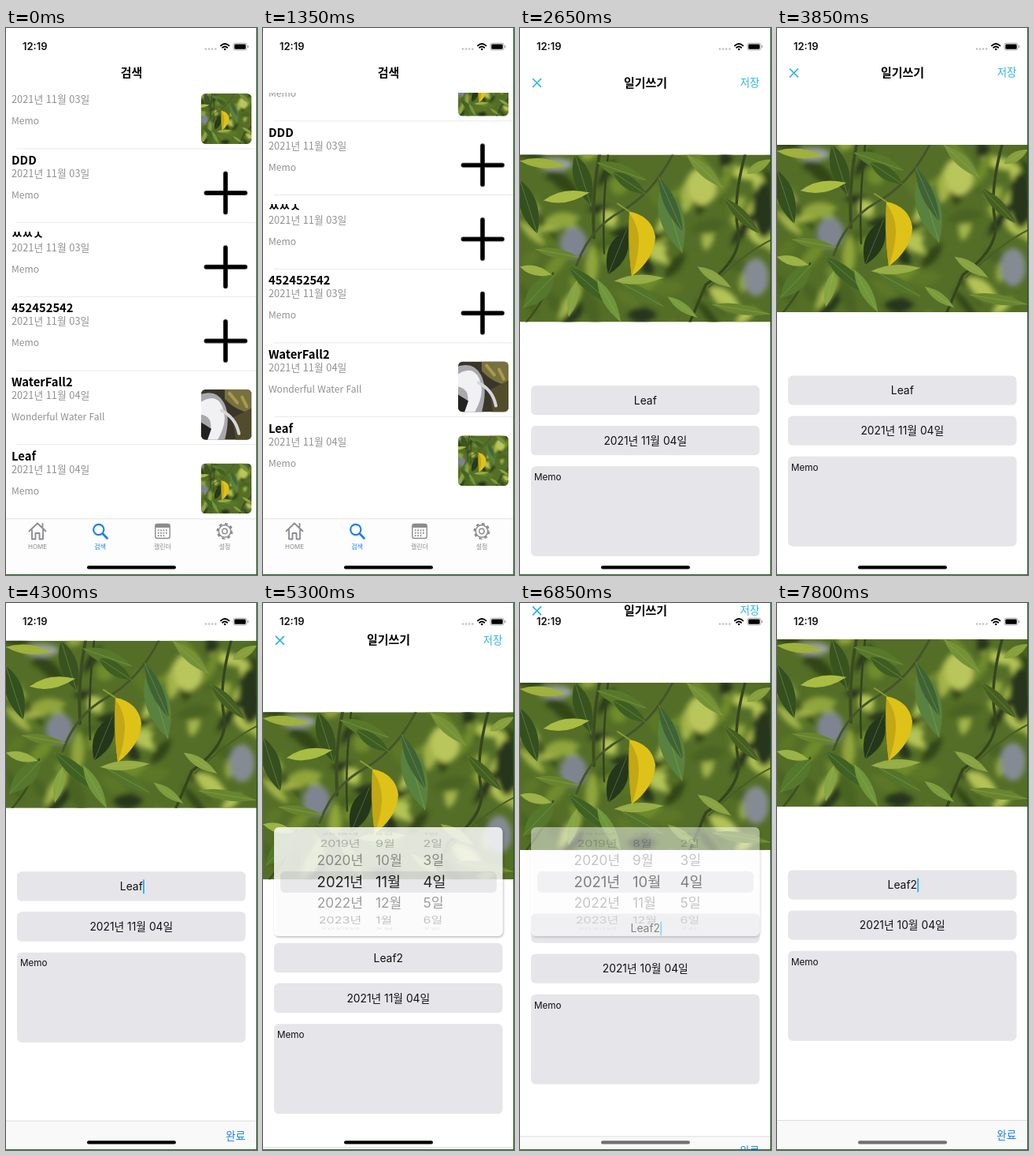
An HTML page that plays this animation: 319 px wide and 693 px high, repeating every 8 s.

```html
<!DOCTYPE html>
<html lang="ko">
<head>
<meta charset="utf-8">
<title>Diary</title>
<style>
  html, body { margin: 0; width: 100%; height: 100%; overflow: hidden; background: #fff; }
  svg { display: block; }
  text { font-family: Inter, "Noto Sans CJK KR", sans-serif; fill: #111; }
  .kr { font-family: "Noto Sans CJK KR", "Noto Sans CJK", sans-serif; }
  .head { font-size: 15px; font-weight: 800; fill: #000; }
  .title { font-size: 14.8px; font-weight: 700; fill: #000; }
  .date { font-size: 12.8px; font-weight: 300; fill: #909090; }
  .memo { font-size: 12.1px; font-weight: 300; fill: #909090; }
  .tab { font-size: 8px; fill: #8b8b8f; }
  .mid { text-anchor: middle; }
  .field { fill: #e5e5ea; }
</style>
</head>
<body>
<svg id="stage" width="319" height="693" viewBox="0 0 319 693"></svg>
<script>
const W = 319, H = 693, LOOP = 8000, STEP = 50;
const LIFT = 102, BAR = 38, ROW = 93.7, ROW0 = 59.3;
const GRAY = '#8b8b8f', CYAN = '#2cb4e8', BLUE = '#1a80ee';

let seed = 11;
const rnd = (a, b) => {
  seed = (seed * 16807) % 2147483647;
  return a + (b - a) * seed / 2147483647;
};
const text = (x, y, cls, str, extra = '') =>
  `<text x="${x}" y="${y}" class="${cls}" ${extra}>${str}</text>`;
const rect = (x, y, w, h, fill, rx = 0, extra = '') =>
  `<rect x="${x}" y="${y}" width="${w}" height="${h}" fill="${fill}" rx="${rx}" ${extra}/>`;
const line = (d, color, w, extra = '') =>
  `<path d="${d}" fill="none" stroke="${color}" stroke-width="${w}" stroke-linecap="round" ${extra}/>`;

// A leaf from base to tip, bulging by w on both sides
function leaf(x1, y1, x2, y2, w, fill) {
  const len = Math.hypot(x2 - x1, y2 - y1);
  const nx = -(y2 - y1) / len * w, ny = (x2 - x1) / len * w;
  const mx = x1 + (x2 - x1) * .45, my = y1 + (y2 - y1) * .45;
  return `<path d="M${x1} ${y1}Q${mx + nx} ${my + ny} ${x2} ${y2}Q${mx - nx} ${my - ny} ${x1} ${y1}" fill="${fill}"/>`;
}

function photo() {
  const tones = ['#314419', '#496320', '#6f8b2c', '#90a53b', '#b4c355', '#26351a', '#5b7726', '#a3b44a'];
  let soft = '', sharp = '';
  for (let i = 0; i < 75; i++) {
    const x = rnd(-10, 325), y = rnd(-10, 220), a = rnd(0, 6.28), l = rnd(25, 60);
    soft += leaf(x, y, x + l * Math.cos(a), y + l * Math.sin(a), rnd(10, 22), tones[i % tones.length]);
  }
  soft += `<ellipse cx="68" cy="112" rx="17" ry="20" fill="#7f8590"/><ellipse cx="300" cy="155" rx="16" ry="24" fill="#858b92"/>
    <ellipse cx="45" cy="12" rx="22" ry="8" fill="#9aa09c"/><ellipse cx="232" cy="40" rx="18" ry="24" fill="#b9c65c"/>
    <ellipse cx="310" cy="70" rx="14" ry="35" fill="#26341d"/>`;
  sharp += line('M101 0Q91 50 94 105', '#3c4c20', 4) + line('M112 0Q104 70 107 125', '#33431d', 2.5)
    + line('M194 0Q168 50 128 72T72 140', '#46552a', 3) + line('M286 0Q270 60 277 95T236 165L216 212', '#36451f', 3.5)
    + line('M319 108Q285 125 240 168', '#4a5d26', 2) + line('M42 150Q35 180 8 212', '#3c4c20', 2.5);
  const leaves = [
    [0, 32, 22, 100, 22, '#35501f'], [0, 8, 58, 14, 12, '#9fb13c'], [70, 0, 90, 64, 22, '#38531f'],
    [98, 10, 160, 32, 18, '#58782a'], [118, 22, 160, 50, 16, '#3e5d22'], [180, 36, 206, 124, 30, '#59813f'],
    [176, 28, 207, 98, 15, '#3f6334'], [212, 0, 258, 42, 14, '#769236'], [135, 96, 112, 152, 24, '#24371a'],
    [30, 58, 88, 48, 14, '#a9bd43'], [44, 152, 4, 194, 23, '#55782c'], [0, 142, 40, 152, 12, '#9bb247'],
    [62, 142, 118, 190, 17, '#3f6124'], [98, 158, 128, 212, 14, '#6f963b'], [72, 160, 62, 205, 13, '#85a442'],
    [128, 162, 182, 192, 15, '#54742b'], [120, 160, 182, 156, 12, '#97ad45'], [188, 180, 225, 206, 11, '#7b9c3d'],
    [226, 142, 268, 168, 12, '#89a343'], [245, 190, 318, 202, 13, '#68852f'], [260, 55, 304, 100, 14, '#455f22'],
    [288, 24, 319, 6, 12, '#87a03c'], [20, 120, 75, 130, 12, '#68842f']
  ];
  for (const l of leaves) {
    sharp += leaf(...l);
    sharp += line(`M${l[0]} ${l[1]}L${l[2]} ${l[3]}`, '#a5bb62', .6, 'opacity=".6"');
  }
  sharp += '<path d="M139 72Q168 78 172 104Q171 132 142 154Q137 118 139 72" fill="#dfc217"/>'
    + '<path d="M139 74Q152 92 151 112T142 154Q137 118 139 74" fill="#c4a715"/>'
    + line('M139 72L124 62', '#8d9a35', 2);
  return rect(0, 0, W, 212, '#546e27') + `<g filter="url(#blur)">${soft}</g><g filter="url(#fine)">${sharp}</g>`;
}

function waterfall() {
  return rect(0, 0, 64, 64, '#39352a')
    + '<g filter="url(#fine)"><path d="M30 0H64V30Q45 28 30 12Z" fill="#77713f"/><path d="M40 36L64 24V64H44Z" fill="#514c2b"/>'
    + '<path d="M0 6Q20 0 29 17Q38 34 30 64H2L0 40Z" fill="#a9a9ad"/><path d="M0 16Q19 4 27 22T21 64H8Q20 36 0 32Z" fill="#f1f1f3"/>'
    + line('M26 27Q44 36 48 56', '#d6d6da', 4) + line('M36 5L46 17M52 10L58 22', '#a79a4e', 4)
    + '<path d="M0 42L13 50L8 64H0Z" fill="#24231f"/></g>';
}

function row(i, title, date, memo, pic) {
  const y = ROW0 + ROW * i;
  const thumb = {
    leaf: `<g transform="translate(248 ${y + 23.6})" clip-path="url(#thumb)"><use href="#photo" transform="translate(-16.2 0) scale(.302)"/></g>`,
    fall: `<g transform="translate(248 ${y + 23.6})" clip-path="url(#thumb)">${waterfall()}</g>`,
    plus: line(`M254.5 ${y + 56}H304M279 ${y + 31.5}V${y + 80.5}`, '#444', 6) + line(`M254.5 ${y + 56}H304M279 ${y + 31.5}V${y + 80.5}`, '#000', 4.4)
  }[pic];
  return rect(13.6, y - .4, 306, .8, '#e4e4e4') + text(7, y + 20, 'kr title', title)
    + text(7, y + 36, 'kr date', date) + text(7, y + 63, 'kr memo', memo) + thumb;
}

function tabs() {
  let dots = '';
  for (let i = 0; i < 11; i++) dots += rect(192.8 + (i % 4) * 3.4, 635.5 + Math.floor(i / 4) * 3.4, 1.8, 1.8, GRAY);
  return rect(0, 621.5, W, 72, '#fdfdfd') + rect(0, 621.5, W, .8, '#dcdcdc')
    + line('M29.5 637.5L40 627.5L50.5 637.5M33 636V647.5H37.5V640H42.5V647.5H47V636M46.5 632V628', GRAY, 1.8, 'stroke-linejoin="round"')
    + `<circle cx="117.8" cy="635.5" r="6.6" fill="none" stroke="${BLUE}" stroke-width="2.2"/>` + line('M122.8 640.6L128.5 646.4', BLUE, 2.8)
    + rect(189.8, 628.5, 18.4, 18, 'none', 2.5, `stroke="${GRAY}" stroke-width="1.4"`) + rect(189.8, 628.5, 18.4, 4.5, GRAY, 1.5) + dots
    + `<g fill="none" stroke="${GRAY}"><circle cx="278" cy="637.5" r="7.7" stroke-width="1.5"/><circle cx="278" cy="637.5" r="3.2" stroke-width="1.4"/>
       <circle cx="278" cy="637.5" r="9.3" stroke-width="2.4" pathLength="16" stroke-dasharray="1"/></g>`
    + text(40, 660, 'tab mid', 'HOME') + text(119.7, 660, 'kr tab mid', '검색', `style="fill:${BLUE};font-weight:500"`)
    + text(199, 660, 'kr tab mid', '캘린더') + text(278, 660, 'kr tab mid', '설정');
}

function editor() {
  return line('M16.5 52L26.5 62M26.5 52L16.5 62', CYAN, 1.7)
    + text(159.5, 62, 'kr head mid', '일기쓰기') + text(279.8, 61.4, 'kr', '저장', `style="font-size:13.4px;font-weight:500;fill:${CYAN}"`)
    + '<use href="#photo" y="148" clip-path="url(#frame)"/>'
    + '<rect class="field" x="14" y="440.5" width="290.5" height="37.3" rx="6"/><rect class="field" x="14" y="491.5" width="290.5" height="37.3" rx="6"/><rect class="field" x="14" y="542.8" width="290.5" height="114" rx="6"/>'
    + text(159.3, 464.4, 'mid', 'Leaf', 'id="name" font-size="13.9"') + text(159.3, 515.4, 'mid', '', 'id="day" font-size="13.8"')
    + text(18, 560.6, '', 'Memo', 'font-size="11.7"') + rect(0, 450.5, 1.9, 18, CYAN, .9, 'id="caret"');
}

function status() {
  let dots = '';
  for (let i = 0; i < 4; i++) dots += `<circle cx="${254 + i * 4.1}" cy="26.6" r="1.3" fill="#c2c2c2"/>`;
  return text(21, 28, '', '12:19', 'font-size="13" font-weight="600"') + dots
    + line('M273 22.4Q278.2 17.8 283.4 22.4M275.2 24.8Q278.2 22.2 281.2 24.8', '#000', 1.9)
    + '<circle cx="278.2" cy="27" r="1.3"/>'
    + rect(289, 19.2, 17, 8.8, 'none', 2.4, 'stroke="#999" stroke-width=".8"') + rect(290.3, 20.5, 14.4, 6.2, '#000', 1.3) + rect(307, 22, 1.2, 3.2, '#999', .6);
}

const D3 = '2021년 11월 03일', D4 = '2021년 11월 04일';
const rows = [
  ['', D3, 'Memo', 'leaf'], ['DDD', D3, 'Memo', 'plus'], ['ㅆㅆㅅ', D3, 'Memo', 'plus'],
  ['452452542', D3, 'Memo', 'plus'], ['WaterFall2', D4, 'Wonderful Water Fall', 'fall'], ['Leaf', D4, 'Memo', 'leaf']
];
const $ = id => document.getElementById(id);

$('stage').innerHTML = `
<defs>
  <filter id="blur"><feGaussianBlur stdDeviation="3.2"/></filter>
  <filter id="fine"><feGaussianBlur stdDeviation=".45"/></filter>
  <filter id="shade" x="-10%" y="-10%" width="120%" height="125%"><feDropShadow dx="1" dy="1.5" stdDeviation="1.5" flood-opacity=".35"/></filter>
  <clipPath id="frame"><rect width="319" height="212"/></clipPath>
  <clipPath id="thumb"><rect width="64" height="64" rx="6"/></clipPath>
  <clipPath id="view"><rect y="82" width="319" height="540"/></clipPath>
  <clipPath id="card"><rect x="14" y="284" width="290.5" height="138" rx="6"/></clipPath>
  <g id="photo" clip-path="url(#frame)">${photo()}</g>
</defs>
${rect(0, 0, W, H, '#fff')}
<g clip-path="url(#view)"><g id="list">${rows.map((r, i) => row(i, ...r)).join('')}</g></g>
${text(159.5, 62, 'kr head mid', '검색')}
${tabs()}
<g id="sheet">${rect(0, 0, W, H, '#fff')}<g id="form">${editor()}</g></g>
<g id="bar">${rect(0, 0, W, BAR + 2, '#f9f9f9')}${rect(0, 0, W, .8, '#d8d8d8')}
  ${text(279.3, 24, 'kr', '완료', `style="font-size:13.6px;font-weight:500;fill:${BLUE}"`)}</g>
<g id="picker">
  ${rect(14, 284, 290.5, 138, '#fff', 6, 'fill-opacity=".9" filter="url(#shade)"')}
  ${rect(22, 340, 275, 27, '#747480', 6, 'fill-opacity=".15"')}
  <g id="wheels" clip-path="url(#card)"></g>
</g>
${status()}
${rect(103, 681.3, 113, 4.2, '#000', 2.1, 'id="home"')}
${rect(318.1, 0, .9, H, '#17601c')}${rect(0, 692.1, W, .9, '#17601c')}`;

// Critically damped spring, time in ms
const spring = ms => {
  const x = Math.max(0, ms) * .0132;
  return 1 - (1 + x) * Math.exp(-x);
};
const ramp = (t, a, b) => Math.min(1, Math.max(0, (t - a) / (b - a)));
const ease = u => 1 - (1 - u) ** 3;

// One wheel turned to value v; label() names each entry
function wheel(v, x, anchor, label) {
  let out = '';
  for (let n = Math.ceil(v - 3); n <= v + 3; n++) {
    const k = n - v, a = k * .4555, d = Math.abs(k);
    const alpha = d < 1 ? 1 - .55 * d : Math.max(0, .45 - .17 * (d - 1));
    out += `<text transform="translate(${x} ${353 + 61.4 * Math.sin(a)}) scale(${1 - .065 * d} ${Math.cos(a)})" y="6.6"
      font-size="18.5" text-anchor="${anchor}" opacity="${alpha}">${label(n)}</text>`;
  }
  return out;
}

let shownMonth = null;
function render(t) {
  const pull = t < 1450 ? 36 * ease(ramp(t, 1100, 1450)) : 36 * (1 - spring(t - 1450));
  const lift = t < 5000 ? spring(t - 3850) : t < 6732 ? 1 - spring(t - 5000) : spring(t - 6732);
  const month = 11 - ease(ramp(t, 6450, 6730));
  const editing = t > 3850 && t < 5000 || t > 6732;
  const blink = 1 - ramp(t, 7250, 7450) + ramp(t, 7600, 7800);

  $('list').setAttribute('transform', `translate(0 ${-pull})`);
  $('sheet').setAttribute('transform', `translate(0 ${H * (1 - spring(t - 2199))})`);
  $('form').setAttribute('transform', `translate(0 ${-LIFT * lift})`);
  $('bar').setAttribute('transform', `translate(0 ${H - BAR * lift})`);
  $('bar').setAttribute('opacity', lift > .002 ? 1 : 0);

  $('name').textContent = t < 4500 ? 'Leaf' : 'Leaf2';
  $('day').textContent = t < 6700 ? D4 : '2021년 10월 04일';
  $('caret').setAttribute('x', 159.5 + $('name').getComputedTextLength() / 2);
  $('caret').setAttribute('opacity', editing ? blink : 0);

  $('picker').setAttribute('opacity', t < 5000 ? 0 : 1 - lift);
  if (month !== shownMonth) {
    shownMonth = month;
    $('wheels').innerHTML = wheel(2021, 98, 'middle', n => n + '년')
      + wheel(month, 143, 'start', n => (n + 11) % 12 + 1 + '월')
      + wheel(4, 203.5, 'start', n => n + '일');
  }
  const g = 112 * ramp(t, 6600, 6850);
  $('home').setAttribute('fill', `rgb(${g},${g},${g})`);
}

const start = performance.now();
function tick() {
  const t = (performance.now() - start) % LOOP;
  render(Math.floor(t / STEP) * STEP);
  requestAnimationFrame(tick);
}
tick();
</script>
</body>
</html>
```
